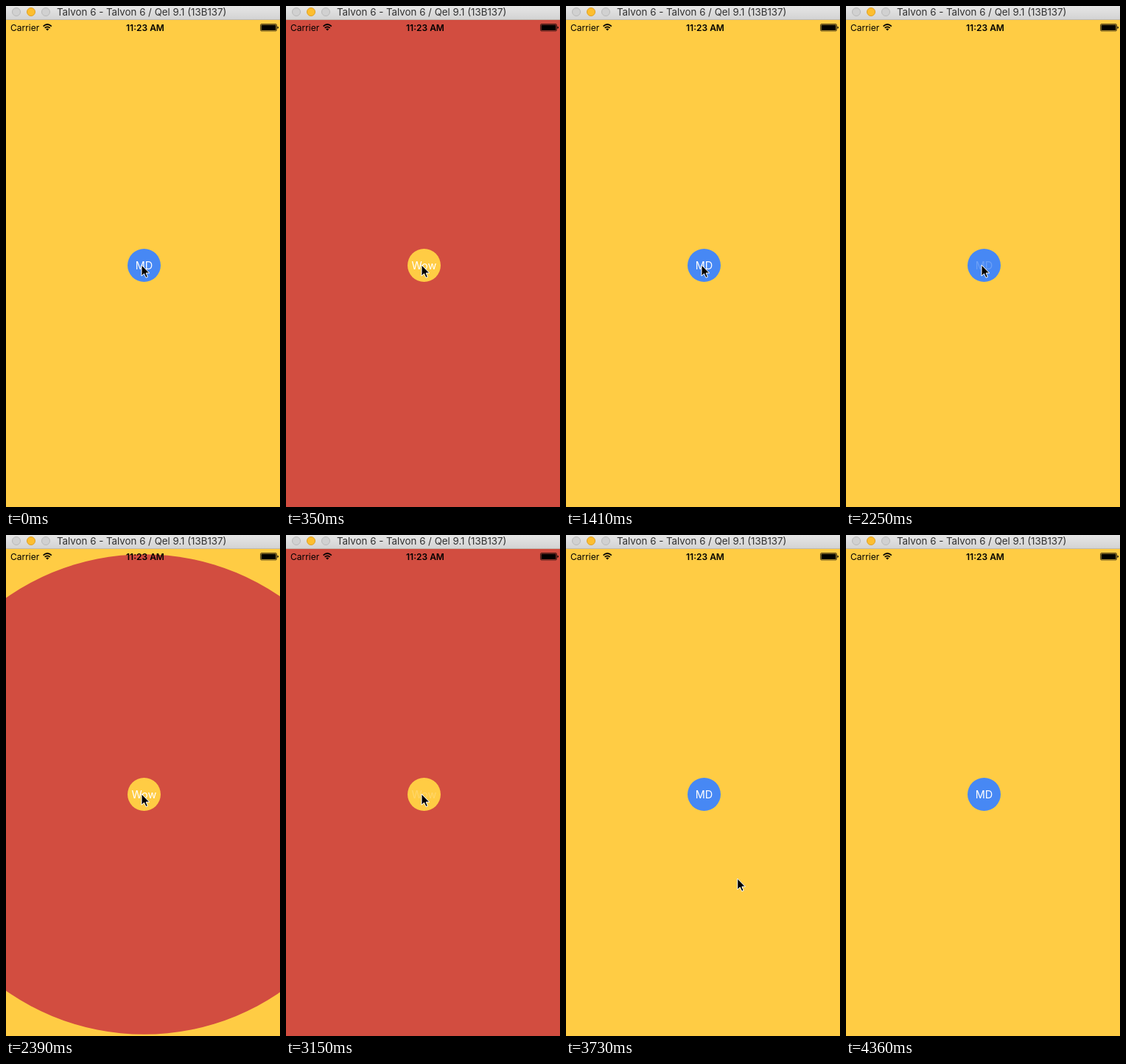
An HTML page that plays this animation: 372x681 px, repeating every 4.78 s.

```html
<!DOCTYPE html>
<html lang="en">
<head>
<meta charset="utf-8">
<title>Circle transition</title>
<style>
  html, body { margin: 0; width: 100%; height: 100%; overflow: hidden; }
  svg { display: block; width: 372px; height: 681px; font-family: Inter, Roboto, sans-serif; }
  .label { font-size: 14.5px; fill: #fff; text-anchor: middle; }
</style>
</head>
<body>
<svg viewBox="0 0 372 681">
  <defs>
    <linearGradient id="bar" x2="0" y2="1">
      <stop stop-color="#e6e6e6"/>
      <stop offset="1" stop-color="#d2d2d2"/>
    </linearGradient>
    <clipPath id="reveal"><circle id="mask" cx="187.5" cy="352.5" r="22.5"/></clipPath>
  </defs>

  <g id="views">
    <g id="red">
      <rect y="19" width="372" height="662" fill="#d24d40"/>
      <circle cx="187.5" cy="352.5" r="22.5" fill="#ffcc44"/>
      <text class="label" x="187.5" y="358">Wow</text>
    </g>
    <g id="yellow">
      <rect y="19" width="372" height="662" fill="#ffcc44"/>
      <circle cx="187.5" cy="352.5" r="22.5" fill="#4788f4"/>
      <text class="label" x="187.5" y="358">MD</text>
    </g>
  </g>

  <g id="statusBar">
    <text x="6" y="33.5" font-size="12">Carrier</text>
    <g fill="none" stroke="#000" stroke-width="1.7">
      <path d="M50.6 27.6Q56.2 22.4 61.8 27.6"/>
      <path d="M52.7 29.9Q56.2 26.7 59.7 29.9"/>
    </g>
    <path d="M54.2 31.4Q56.2 29.8 58.2 31.4L56.2 33.6Z"/>
    <text x="189" y="33.5" font-size="12" font-weight="600" text-anchor="middle">11:23 AM</text>
    <rect x="345.5" y="24.5" width="22" height="9.5" rx="1.5" fill="none" stroke="#000" stroke-opacity=".65"/>
    <rect x="346.5" y="25.5" width="20" height="7.5" rx=".5"/>
    <path d="M368.5 27.5Q370 28 370 29.2T368.5 31Z"/>
  </g>

  <g id="titleBar">
    <rect width="372" height="19" fill="url(#bar)"/>
    <rect y="18" width="372" height="1" fill="#bdb9b1"/>
    <g fill="#d1d1d1" stroke="#b9b9b9">
      <circle cx="14" cy="8" r="5.5"/>
      <circle cx="34" cy="8" r="5.5" fill="#fdbe2f" stroke="#dfa023"/>
      <circle cx="54" cy="8" r="5.5"/>
    </g>
    <text x="69" y="13" font-size="13.3" fill="#303030">Talvon 6 - Talvon 6 / Qel 9.1 (13B137)</text>
  </g>

  <path id="cursor" d="M0 0V15L3.5 11.8 6 17.3 8.4 16.3 6.1 11H10.7Z" stroke="#fff" stroke-linejoin="round"/>
</svg>

<script>
const LOOP = 4780;
const BUTTON_RADIUS = 22.5;
const FULL_RADIUS = 690;
const PRESSED = -1;

// The mask snaps back to the button for a moment before it is removed.
const PHASES = [PRESSED, .15, .47, .75, 0, 1];

const transitions = [
  { from: 'yellow', to: 'red', times: [120, 180, 240, 290, 350] },
  { from: 'red', to: 'yellow', times: [1250, 1300, 1360, 1410] },
  { from: 'yellow', to: 'red', times: [2250, 2310, 2360, 2400, 2440, 2490] },
  { from: 'red', to: 'yellow', times: [3150, 3210, 3270, 3330, 3380, 3440] },
];

const cursorMoves = [
  { start: 3620, end: 3790, steps: 4, from: [184, 352], to: [281.5, 582] },
  { start: 3960, end: 4360, steps: 8, from: [281.5, 582], to: [344, 684] },
];

const byId = id => document.getElementById(id);
const views = byId('views'), mask = byId('mask'), cursor = byId('cursor');
const ease = p => p * p * (3 - 2 * p);

function drawViews(time) {
  let from = 'red', to = 'yellow', phase = 1;
  for (const move of transitions) {
    const count = move.times.filter(t => t <= time).length;
    if (!count) break;
    ({ from, to } = move);
    phase = PHASES.slice(-move.times.length)[count - 1];
  }
  const pressed = phase === PRESSED;
  const front = byId(pressed ? from : to);
  const back = byId(pressed ? to : from);
  if (views.lastElementChild !== front) views.append(front);
  back.removeAttribute('clip-path');
  if (pressed || phase === 1) front.removeAttribute('clip-path');
  else front.setAttribute('clip-path', 'url(#reveal)');
  front.querySelector('text').setAttribute('opacity', pressed ? .2 : 1);
  mask.setAttribute('r', BUTTON_RADIUS + (FULL_RADIUS - BUTTON_RADIUS) * ease(Math.max(phase, 0)));
}

function drawCursor(time) {
  let position = cursorMoves[0].from;
  for (const { start, end, steps, from, to } of cursorMoves) {
    if (time < start) break;
    const step = Math.floor((time - start) / (end - start) * (steps - 1) + 1e-6);
    const p = ease(Math.min((step + 1) / steps, 1));
    position = from.map((value, axis) => value + (to[axis] - value) * p);
  }
  cursor.setAttribute('transform', `translate(${position})`);
}

const startTime = performance.now();
function frame() {
  const time = (performance.now() - startTime) % LOOP;
  drawViews(time);
  drawCursor(time);
  requestAnimationFrame(frame);
}
frame();
</script>
</body>
</html>
```
